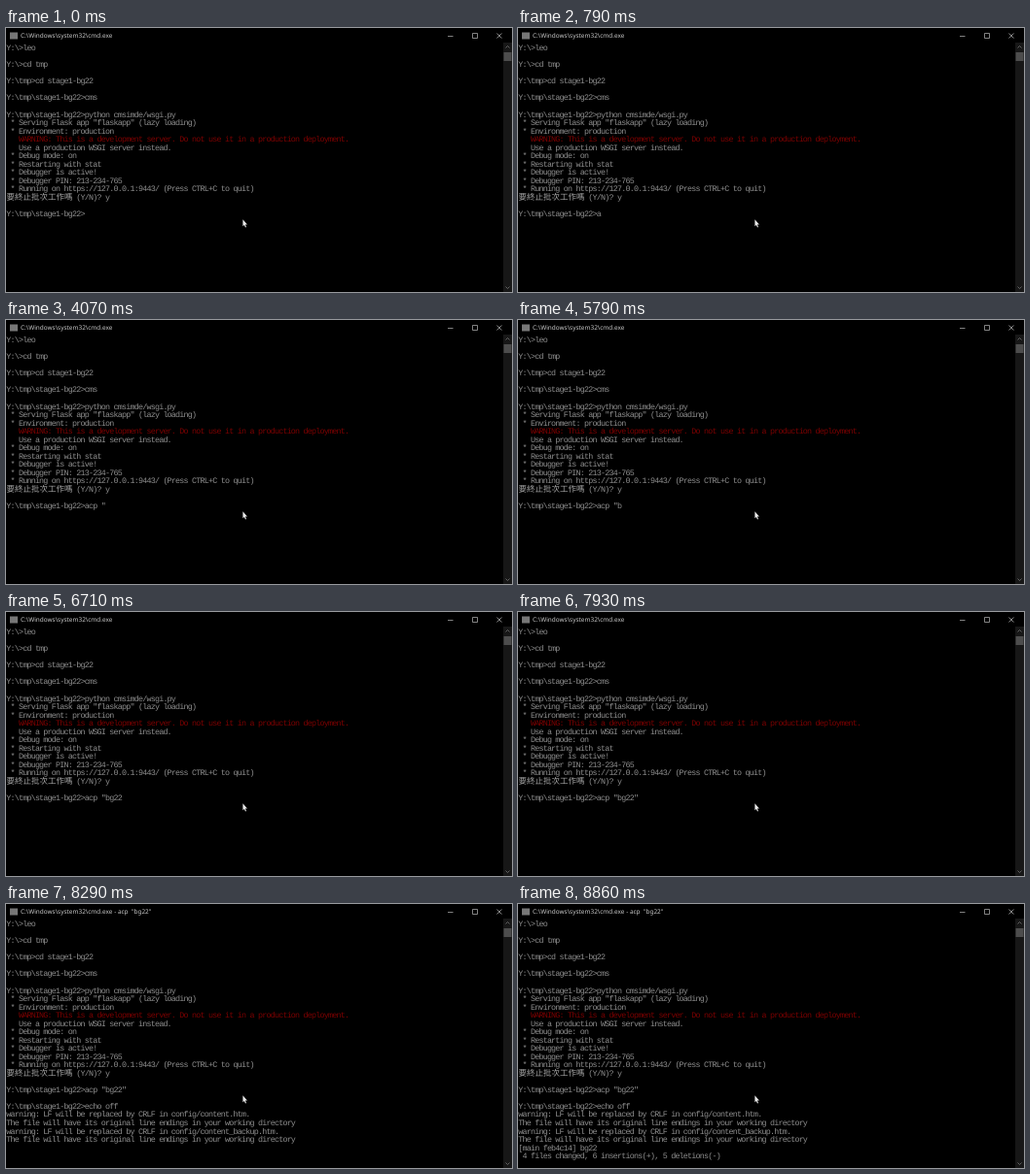
Recreate the animation shown at these times as an HTML page. Size 520x272 px, loop 9.5 s.

```html
<!DOCTYPE html>
<html lang="zh-Hant">
<head>
<meta charset="utf-8">
<style>
html, body { margin: 0; width: 100%; height: 100%; overflow: hidden; background: #000; }
svg { display: block; }
text { white-space: pre; text-rendering: geometricPrecision; }
#rows { font: 8.4px "Liberation Mono", monospace; letter-spacing: -.784px; fill: #8e8e8e; }
#rows .warn { fill: #7c0000; }
.cjk { font: 300 8.51px "Noto Sans CJK TC", "Noto Sans CJK", sans-serif; fill: #a6a6a6; }
#title { font: 6.45px "Noto Sans", sans-serif; fill: #c8c8c8; }
</style>
</head>
<body>
<svg width="520" height="272" viewBox="0 0 520 272">
  <rect width="520" height="272"/>
  <rect x="4" y="4.5" width="8" height="7" fill="#777"/>
  <text id="title" x="15" y="10.4"></text>
  <path d="M454 8.5h5.5M479.5 5.5h5v5h-5zM504.5 5.5l5 5m0-5l-5 5" fill="none" stroke="#bbb" stroke-width=".7"/>
  <rect x="511" y="15" width="9" height="257" fill="#171717"/>
  <rect x="511.5" y="25" width="8" height="9" fill="#4d4d4d"/>
  <path d="M513.5 20.5l2-2 2 2M513.5 266.5l2 2 2-2" fill="none" stroke="#777" stroke-width=".8"/>
  <g id="rows"></g>
  <text class="cjk" x=".4" y="177">要終止批次工作嗎</text>
  <path d="M243.4 197.3v7l1.5-1.4 1.1 2.5 1-.5-1.1-2.4h2.1z" fill="#e8e8e8"/>
</svg>
<script>
const LOOP = 9500;
const prompt = 'Y:\\tmp\\stage1-bg22>';
const typed = 'acp "bg22"';
const keyTimes = [790, 1210, 1860, 3000, 4070, 5790, 6000, 6570, 6710, 7710];
const ENTER = 8210, WARN = 8290, COMMIT = 8860;
const INPUT_ROW = 20;

// [row, text, time it appears]
const lines = [
  [0, 'Y:\\>leo'],
  [2, 'Y:\\>cd tmp'],
  [4, 'Y:\\tmp>cd stage1-bg22'],
  [6, prompt + 'cms'],
  [8, prompt + 'python cmsimde/wsgi.py'],
  [9, ' * Serving Flask app "flaskapp" (lazy loading)'],
  [10, ' * Environment: production'],
  [11, '   WARNING: This is a development server. Do not use it in a production deployment.'],
  [12, '   Use a production WSGI server instead.'],
  [13, ' * Debug mode: on'],
  [14, ' * Restarting with stat'],
  [15, ' * Debugger is active!'],
  [16, ' * Debugger PIN: 213-234-765'],
  [17, ' * Running on https://127.0.0.1:9443/ (Press CTRL+C to quit)'],
  [18, ' '.repeat(17) + '(Y/N)? y'],
  [INPUT_ROW, prompt],
  [22, prompt + 'echo off', ENTER],
  [23, 'warning: LF will be replaced by CRLF in config/content.htm.', WARN],
  [24, 'The file will have its original line endings in your working directory', WARN],
  [25, 'warning: LF will be replaced by CRLF in config/content_backup.htm.', WARN],
  [26, 'The file will have its original line endings in your working directory', WARN],
  [27, '[main feb4c14] bg22', COMMIT],
  [28, ' 4 files changed, 6 insertions(+), 5 deletions(-)', COMMIT]
];

const rows = document.getElementById('rows');
const title = document.getElementById('title');
const items = lines.map(([row, text, at = 0]) => {
  const el = document.createElementNS('http://www.w3.org/2000/svg', 'text');
  el.setAttribute('x', .2);
  el.setAttribute('y', 23.3 + 8.53 * row);
  el.textContent = text;
  if (text.includes('WARNING')) el.classList.add('warn');
  rows.append(el);
  return { el, row, at };
});
const input = items.find(item => item.row === INPUT_ROW).el;

function draw(now) {
  const t = now % LOOP;
  for (const { el, at } of items) el.style.display = t >= at ? '' : 'none';
  input.textContent = prompt + typed.slice(0, keyTimes.filter(k => k <= t).length);
  title.textContent = 'C:\\Windows\\system32\\cmd.exe' + (t >= ENTER ? ' - acp  "bg22"' : '');
  requestAnimationFrame(draw);
}
draw(performance.now());
</script>
</body>
</html>
```
